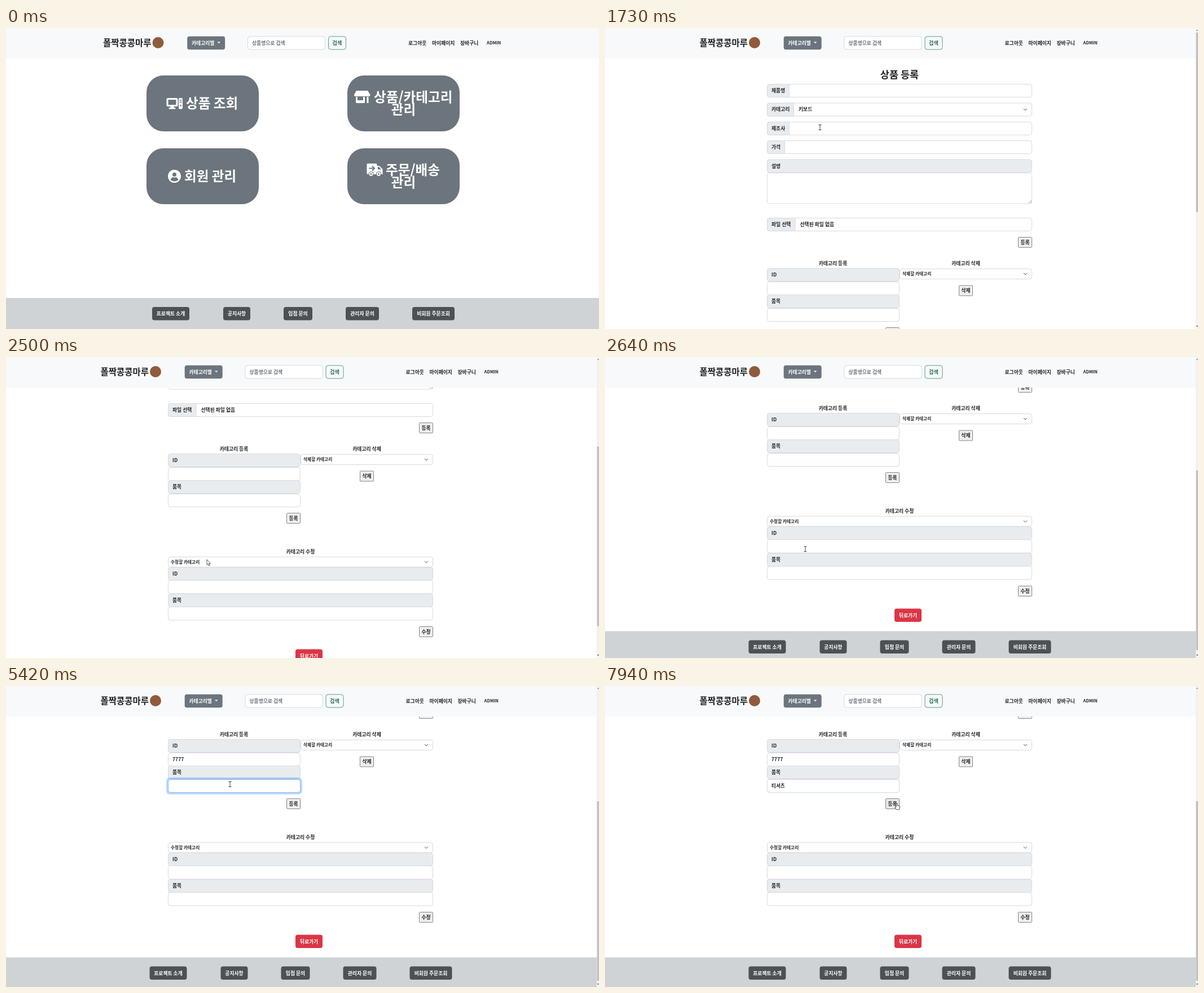
Animation, 1051 px wide and 533 px high, one loop 8 s. Source, as an HTML page with a canvas:

```html
<!DOCTYPE html>
<html lang="ko">
<head>
<meta charset="utf-8">
<style>
  html, body { margin: 0; width: 100%; height: 100%; overflow: hidden; background: #fff; }
  canvas { display: block; }
</style>
</head>
<body>
<canvas id="stage" width="1051" height="533"></canvas>
<script>
const ctx = document.getElementById('stage').getContext('2d');
const W = 1051, H = 533, LOOP = 8000;
const FONT = '"Noto Sans CJK KR", "Noto Sans", sans-serif';
const INK = '#212529', GRAY = '#6c757d', LINE = '#d6dadf', LABEL = '#e9ecef';
const FORM_SHIFT = -4.5;

const PAGE_OPEN = 1180, ID_CLICK = 3270, ITEM_CLICK = 4890, SUBMIT = 7800, BLINK = 530;
const SCROLL = [[1800, 0], [2220, 165], [2570, 276], [2640, 326], [2710, 331]];
const POINTER = [
  [130, 1012, 230], [830, 702, 150], [1250, 702, 150], [1660, 381, 176], [1800, 381, 176],
  [2220, 359, 413], [2640, 355, 340], [3200, 410, 139], [4400, 410, 139], [4670, 400, 169],
  [4870, 400, 169], [5200, 397, 174], [7120, 397, 174], [7800, 517, 207]
];
const SHAPES = [[1180, 'arrow'], [1500, 'beam'], [1850, 'arrow'], [2590, 'beam'], [7360, 'arrow'], [7700, 'hand']];
const ID_TYPING = [[0, ''], [4400, '7'], [4470, '77'], [4530, '777'], [4600, '7777']];
const ITEM_TYPING = [[0, ''], [5820, 'ㅌ'], [5960, '티'], [6090, '팃'], [6230, '티셔'], [6510, '티셫'], [6650, '티셔츠']];

const clamp = v => Math.max(0, Math.min(1, v));
const smooth = v => v * v * (3 - 2 * v);
const latest = (steps, t) => steps.filter(s => s[0] <= t).pop();

// Interpolates every column of a [time, ...values] list.
function track(keys, t, ease = v => v) {
  let i = 0;
  while (i < keys.length - 2 && t >= keys[i + 1][0]) i++;
  const [a, b] = [keys[i], keys[i + 1]];
  const k = ease(clamp((t - a[0]) / (b[0] - a[0])));
  return a.slice(1).map((v, n) => v + (b[n + 1] - v) * k);
}

function text(str, x, y, { size = 8.8, color = INK, weight = 700, align = 'left' } = {}) {
  ctx.font = `${weight} ${size}px ${FONT}`;
  ctx.textAlign = align;
  ctx.textBaseline = 'middle';
  ctx.fillStyle = color;
  ctx.fillText(str, x, y);
  return ctx.measureText(str).width;
}

function box(x, y, w, h, fill, stroke, radius = 4) {
  const inset = stroke ? 0.5 : 0;
  ctx.beginPath();
  ctx.roundRect(x + inset, y + inset, w - 2 * inset, h - 2 * inset, radius);
  ctx.fillStyle = fill;
  ctx.fill();
  if (stroke) {
    ctx.strokeStyle = stroke;
    ctx.lineWidth = 1;
    ctx.stroke();
  }
}

function line(points, color, width = 1) {
  ctx.beginPath();
  points.forEach(([x, y]) => ctx.lineTo(x, y));
  ctx.strokeStyle = color;
  ctx.lineWidth = width;
  ctx.stroke();
}

function shape(path, fill, stroke) {
  const p = new Path2D(path);
  ctx.fillStyle = fill;
  ctx.fill(p);
  if (stroke) {
    ctx.strokeStyle = stroke;
    ctx.lineWidth = 0.8;
    ctx.stroke(p);
  }
}

function at(x, y, draw) {
  ctx.save();
  ctx.translate(x, y);
  draw();
  ctx.restore();
}

function solidButton(label, x, y, w, fill) {
  box(x, y, w, 23.5, fill);
  text(label, x + w / 2, y + 12, { color: '#fff', align: 'center' });
}

function plainButton(label, x, y, fill = '#efefef') {
  box(x, y, 25, 19, fill, '#858585', 1);
  text(label, x + 12.5, y + 9.5, { align: 'center' });
}

function heading(label, x, y) {
  text(label, x, y, { align: 'center' });
}

function labelRow(label, y, w) {
  box(287, y, w, 24, LABEL, LINE);
  text(label, 295, y + 12);
}

function field(label, labelWidth, y, value = '') {
  box(287, y, 470, 24, '#fff', LINE);
  box(287, y, labelWidth, 24, LABEL, LINE, [4, 0, 0, 4]);
  text(label, 295, y + 11.5);
  text(value, 295 + labelWidth, y + 11.5);
}

function chevron(x, y) {
  line([[x - 3, y - 1.5], [x, y + 1.5], [x + 3, y - 1.5]], '#4a5056', 1);
}

function smallSelect(label, x, y, w) {
  box(x, y, w, 19, '#fff', LINE);
  text(label, x + 5, y + 9.5, { size: 7.7 });
  chevron(745, y + 9.5);
}

function input(y, focus = 0) {
  if (focus > 0) box(284, y - 3, 241, 30, `rgba(13,110,253,${0.27 * focus})`, null, 6);
  box(287, y, 235, 24, '#fff', focus > 0.5 ? '#86b7fe' : LINE);
}

function header(shift) {
  box(0, 0, W, 54, '#f8f9fa', null, 0);
  at(shift, 0, headerItems);
}

function headerItems() {
  text('폴짝콩콩마루', 172, 26, { size: 15.5 });
  box(259.5, 16, 20, 20, '#8f5b3b', null, 10);
  box(321.2, 14.8, 67, 23.4, GRAY);
  text('카테고리별', 329, 26.5, { color: '#fff' });
  shape('M374.5 24.5h5.5l-2.75 2.8z', '#fff');
  box(428, 14.5, 138, 24, '#fff', LINE);
  text('상품명으로 검색', 436, 26.5, { color: GRAY });
  box(571, 14.5, 32, 24, '#f8f9fa', '#58a08a');
  text('검색', 587, 26.5, { color: '#2c6d57', align: 'center', size: 9.2 });
  [['로그아웃', 713], ['마이페이지', 755], ['장바구니', 805]].forEach(([s, x]) => text(s, x, 26.5));
  text('ADMIN', 852, 26.5, { size: 7.7 });
}

function footer(y, shift) {
  box(0, y, W, 56, '#d0d3d6', null, 0);
  [['프로젝트 소개', 259, 66], ['공지사항', 385, 48], ['입점 문의', 492, 51],
   ['관리자 문의', 602, 59], ['비회원 주문조회', 720, 75]]
    .forEach(([s, x, w]) => solidButton(s, x + shift, y + 16, w, '#4d5154'));
}

const icons = {
  computer(bg) {
    box(0, 0, 20, 15, '#fff', null, 2.5);
    box(3, 3, 14, 9, bg, null, 0);
    box(7, 15, 6, 3, '#fff', null, 0);
    box(4, 17, 12, 2.5, '#fff', null, 1);
    box(21.5, 0, 7, 19.5, '#fff', null, 2);
    box(23, 3, 4, 1.5, bg, null, 0);
    box(23, 6.5, 4, 1.5, bg, null, 0);
    box(23.7, 12, 2.6, 2.6, bg, null, 1.3);
  },
  shop() {
    shape('M4 0H24L28.5 7Q29 10 26 10H2.5Q-.5 10 0 7Z', '#fff');
    shape('M3 11H6V17H16V11H19V20.5Q19 22 17.5 22H4.5Q3 22 3 20.5ZM22.5 11H25.5V22H22.5Z', '#fff');
  },
  person(bg) {
    box(0, 0, 23, 23, '#fff', null, 11.5);
    box(8, 5, 7, 7, bg, null, 3.5);
    shape('M4.5 18Q6 13.5 9 13.5H14Q17 13.5 18.5 18Q11.5 23 4.5 18Z', bg);
  },
  truck(bg) {
    box(0, 0, 18, 19, '#fff', null, 2);
    shape('M17 4H22L28 10V19H17Z', '#fff');
    shape('M19.5 6H21.5L25.5 10.5H19.5Z', bg);
    line([[4, 8.5], [13, 8.5]], bg, 2);
    line([[9.5, 4.5], [13.5, 8.5], [9.5, 12.5]], bg, 2);
    [7.5, 21].forEach(x => {
      box(x - 4.5, 14, 9, 9, bg, null, 4.5);
      box(x - 3.5, 15, 7, 7, '#fff', null, 3.5);
      box(x - 1.5, 17, 3, 3, bg, null, 1.5);
    });
  }
};

function card(x, y, icon, iconX, iconY, lines, textX, hover) {
  const fill = hover ? '#5c636a' : GRAY;
  const style = { size: 23.6, color: '#fff' };
  const middle = y + (lines.length > 1 ? 38 : 49);
  box(x, y, 199, 99, fill, null, 30);
  at(iconX, iconY, () => icons[icon](fill));
  text(lines[0], textX, middle, style);
  if (lines[1]) text(lines[1], x + 99.5, middle + 22, { ...style, align: 'center' });
}

function homePage(hover) {
  card(249, 84, 'computer', 284.5, 124, ['상품 조회'], 319);
  card(605, 84, 'shop', 617, 111, ['상품/카테고리', '관리'], 652, hover);
  card(249, 213, 'person', 287, 251, ['회원 관리'], 316);
  card(605, 213, 'truck', 639.5, 240, ['주문/배송', '관리'], 673);
  footer(478, 0);
  header(0);
}

const focusLevel = (t, from, to) => clamp((t - from) / 150) * (1 - clamp((t - to) / 150));
const caretOn = (t, since) => Math.floor((t - since) / BLINK) % 2 === 0;

function typedValue(t, steps, y, click, blur) {
  const [since, value] = latest(steps, t);
  const width = text(value, 295, y, { size: 8.6 });
  if (t >= click && t < blur && caretOn(t, Math.max(since, click)))
    line([[295.5 + width, y - 5], [295.5 + width, y + 5]], '#222', 0.9);
  return width;
}

function categoryForm(t) {
  const idFocus = focusLevel(t, ID_CLICK, ITEM_CLICK);
  const itemFocus = focusLevel(t, ITEM_CLICK, SUBMIT);
  heading('카테고리 등록', 404, 417);
  labelRow('ID', 425, 235);
  input(496);
  labelRow('품목', 472, 235);
  input(449, idFocus);
  if (itemFocus) input(496, itemFocus);

  typedValue(t, ID_TYPING, 461, ID_CLICK, ITEM_CLICK);
  if (t >= ID_CLICK && t < ITEM_CLICK) {
    shape('M507 459.5h5l-2.5 -3zM507 462.5h5l-2.5 3z', '#444');
  }
  const width = typedValue(t, ITEM_TYPING, 507.5, ITEM_CLICK, SUBMIT);
  if (t >= 5820 && t < 7120) line([[295 + width - 8, 512.5], [295 + width, 512.5]], INK, 0.9);

  plainButton('등록', 497, 530, t > 7700 ? (t >= SUBMIT && t < 7940 ? '#f5f5f5' : '#e9e9e9') : undefined);
}

function formPage(t) {
  const [scroll] = track(SCROLL, t);
  at(0, -Math.round(scroll), () => {
    text('상품 등록', 522, 82, { size: 17.5, align: 'center' });
    field('제품명', 40, 99);
    field('카테고리', 48, 132.5, '키보드');
    chevron(745, 144.5);
    field('제조사', 40, 166);
    field('가격', 32, 199);
    box(287, 256, 470, 55.5, '#fff', LINE);
    labelRow('설명', 232.5, 470);
    line([[751, 310], [756, 305]], '#777', 0.7);
    line([[754, 310], [756, 308]], '#777', 0.7);
    field('파일 선택', 50.5, 336, '선택된 파일 없음');
    plainButton('등록', 732, 370);

    categoryForm(t);
    heading('카테고리 삭제', 639.5, 417);
    smallSelect('삭제할 카테고리', 522, 426, 235);
    plainButton('삭제', 627, 455.5);

    heading('카테고리 수정', 522, 599);
    smallSelect('수정할 카테고리', 287, 607.5, 470);
    box(287, 649, 470, 24.5, '#fff', LINE);
    box(287, 696, 470, 24.5, '#fff', LINE);
    labelRow('ID', 626, 470);
    labelRow('품목', 673, 470);
    plainButton('수정', 732, 731);
    solidButton('뒤로가기', 513, 771.5, 48, '#dc3545');
    footer(811.5, FORM_SHIFT);
  });
  header(FORM_SHIFT);
  scrollbar(scroll);
}

function scrollbar(scroll) {
  box(1047, 0, 4, H, '#f1f1f1', null, 0);
  box(1047.5, 8 + scroll * 0.592, 3.5, 318, '#c1c1c1', null, 0);
  shape('M1048 5h3l-1.5 -2z', '#777');
  shape('M1048 527h3l-1.5 2z', '#333');
}

const pointers = {
  arrow() {
    shape('M0 0V9.5L2.2 7.5L3.7 11L5.2 10.3L3.7 7H6.6Z', '#fff', '#333');
  },
  beam() {
    line([[-2.5, -4.5], [2.5, -4.5]], '#333', 0.9);
    line([[0, -4.5], [0, 4.5]], '#333', 0.9);
    line([[-2.5, 4.5], [2.5, 4.5]], '#333', 0.9);
  },
  hand() {
    shape('M-1 1Q0 -.6 1 1V4.5L4.8 5.4Q5.7 5.7 5.6 7L4.7 11.8H-.5L-3.3 7.8Q-3.3 6.2 -1 7.5Z', '#fff', '#222');
  }
};

function render(t) {
  const [x, y] = track(POINTER, t, smooth);
  const home = t < PAGE_OPEN;
  const hover = home && x < 804 && y > 84 && y < 183;
  ctx.fillStyle = '#fff';
  ctx.fillRect(0, 0, W, H);
  if (home) homePage(hover); else formPage(t);
  if (t < 130) return;
  const kind = home ? (hover ? 'hand' : 'arrow') : latest(SHAPES, t)[1];
  at(x, y, pointers[kind]);
}

const start = performance.now();
function tick() {
  render((performance.now() - start) % LOOP);
  requestAnimationFrame(tick);
}
tick();
</script>
</body>
</html>
```
